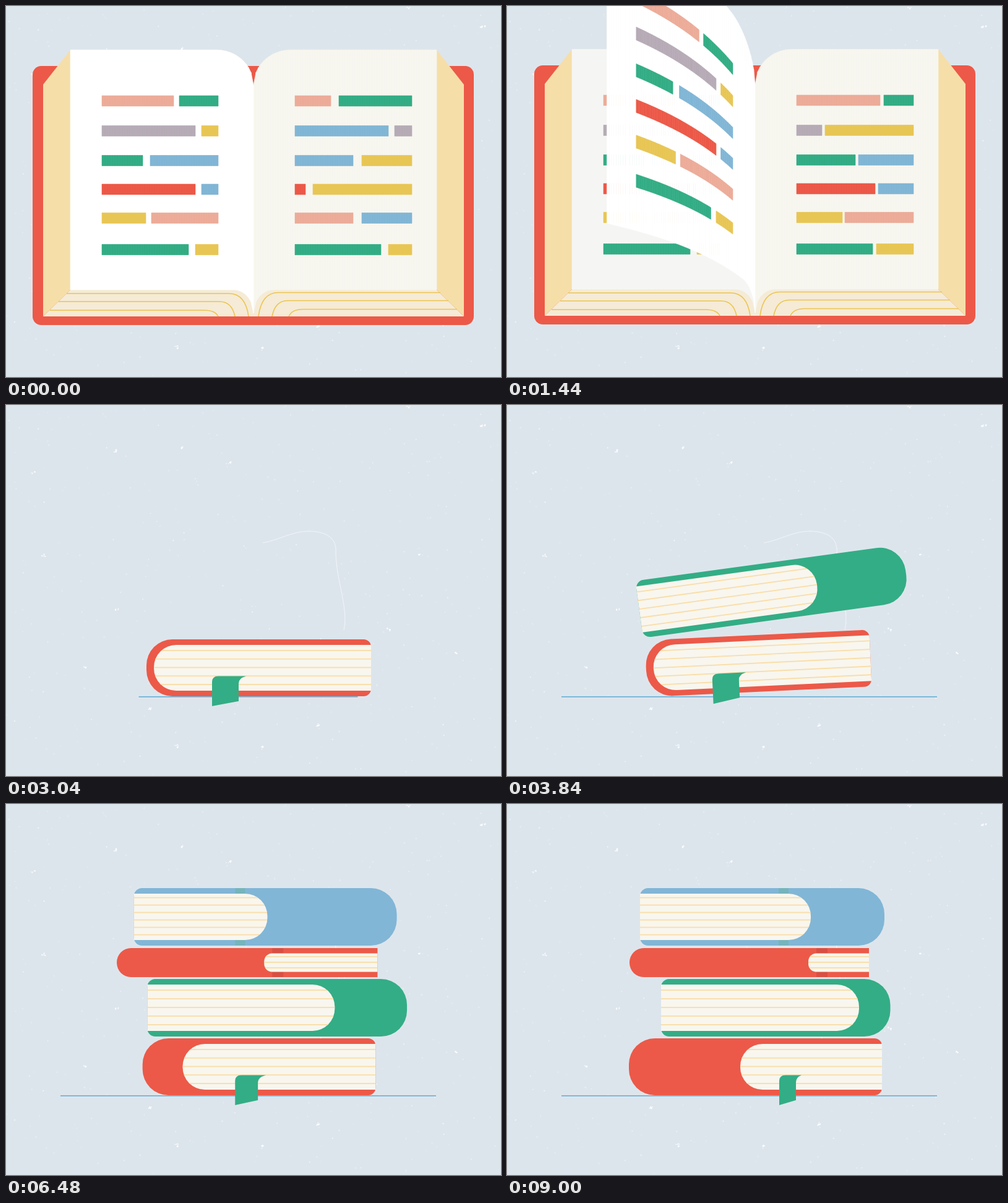
Write an HTML page with a canvas that moves like this. It is 800 px wide and 600 px high and loops after 9040 ms.

```html
<!DOCTYPE html>
<html>
<head>
<meta charset="utf-8">
<style>
html, body { margin: 0; width: 800px; height: 600px; overflow: hidden; background: #dde5ec; }
canvas { display: block; }
</style>
</head>
<body>
<canvas id="stage" width="800" height="600"></canvas>
<script>
const ctx = document.getElementById('stage').getContext('2d');
const LOOP = 9040, PI = Math.PI;
const RED = '#ec5948', DARK_RED = '#d94f42', GREEN = '#33ad85', BLUE = '#81b6d6';
const CREAM = '#f7f6ef', EDGE = '#f6dea9', BLOCK = '#f5ebd6', GOLD = '#ecc44f';
const INK = { P: '#ecac99', G: GREEN, M: '#b6abb6', Y: '#e8c655', B: BLUE, R: RED };

const clamp = (v) => Math.max(0, Math.min(1, v));
const lerp = (a, b, p) => a + (b - a) * p;
const span = (t, start, length) => clamp((t - start) / length);
const smooth = (p) => p * p * (3 - 2 * p);

function poly(points, fill, seam) {
  ctx.beginPath();
  points.forEach(([x, y]) => ctx.lineTo(x, y));
  ctx.closePath();
  ctx.fillStyle = fill;
  ctx.fill();
  if (seam) {
    ctx.strokeStyle = fill;
    ctx.lineWidth = 0.6;
    ctx.stroke();
  }
}

function rounded(x, y, w, h, radii, fill) {
  ctx.beginPath();
  ctx.roundRect(x, y, w, h, radii);
  ctx.fillStyle = fill;
  ctx.fill();
}

// ---- paper texture ----
const texture = document.createElement('canvas');
texture.width = 800;
texture.height = 600;
(function paintTexture() {
  const c = texture.getContext('2d');
  let seed = 7;
  const rnd = () => (seed = (seed * 16807) % 2147483647) / 2147483647;
  c.fillStyle = '#dde5ec';
  c.fillRect(0, 0, 800, 600);
  c.fillStyle = '#fff';
  const dot = (x, y, r, alpha) => {
    c.globalAlpha = alpha;
    c.beginPath();
    c.ellipse(x, y, r, r * (0.5 + rnd() * 0.5), rnd() * PI, 0, 2 * PI);
    c.fill();
  };
  for (let i = 0; i < 520; i++) dot(rnd() * 800, rnd() * 600, 0.4 + rnd() * 0.7, 0.25 + rnd() * 0.5);
  const flecks = [[650, 2], [180, 331], [503, 517], [361, 94], [284, 69], [43, 110], [275, 552],
    [412, 554], [770, 32], [128, 425], [727, 400], [667, 240], [617, 363], [60, 243], [233, 490], [175, 73]];
  flecks.forEach(([x, y]) => {
    for (let k = 0; k < 4; k++) dot(x + rnd() * 7 - 3, y + rnd() * 5 - 2, 0.8 + rnd(), 0.85);
  });
  c.globalAlpha = 0.65;
  c.strokeStyle = '#fff';
  c.lineWidth = 0.9;
  c.stroke(new Path2D('M415 223C440 219 462 204 490 204C520 205 535 216 533 240C534 285 554 330 546 364'));
})();

// ---- open book; distances run outward from the spine at x = 400 ----
const ROW_Y = [145, 193.5, 241.5, 288, 334.5, 385.5];
const text = (from, to, colors, cuts) => ({ from, to, colors: colors.split(' '), cuts });
const LEFT = text(57, 245, 'GP YM BG BR PY YG', [[120, 129], [84, 94], [167, 179], [84, 94], [165, 174], [94, 105]]);
const RIGHT_A = text(67, 256, 'PG BM BY RY PB GY', [[125, 138], [218, 228], [161, 175], [84, 96], [161, 175], [206, 218]]);
const RIGHT_B = text(67, 256, 'PG MY GB RB YP GY', [[202, 208], [108, 113], [162, 167], [194, 199], [141, 145], [190, 196]]);

const round = (d, r) => d < r ? 1 - Math.sqrt(1 - ((r - d) / r) ** 2) : 0;
const pageTop = (d) => 71 + 57 * round(d, 60);
const pageBottom = (d) => 459 + 38 * round(d, 32);

// angle 0 lies flat on the right, PI flat on the left
function page(angle, front, back, frontFill = CREAM, backFill = '#fff') {
  const N = 74, step = 296 / N;
  const bend = 0.5 * Math.min(1, 3 * Math.sin(angle));
  const xs = [0], hs = [0];
  for (let i = 0; i < N; i++) {
    const a = angle + (PI / 2 - angle) * bend * (1 - i / N) ** 1.5;
    xs.push(xs[i] + Math.cos(a) * step);
    hs.push(hs[i] + Math.sin(a) * step);
  }
  const at = (d, y) => {
    const i = Math.min(N - 1, Math.floor(d / step)), k = d / step - i;
    const lift = lerp(hs[i], hs[i + 1], k) / 140;
    return [400 + lerp(xs[i], xs[i + 1], k), y * (1 + 0.23 * lift) - 196 * lift];
  };
  for (let i = 0; i < N; i++) {
    const a = i * step, b = a + step;
    const facing = xs[i + 1] > xs[i];
    poly([at(a, pageTop(a)), at(b, pageTop(b)), at(b, pageBottom(b)), at(a, pageBottom(a))],
      facing ? frontFill : backFill, true);
  }
  for (let i = 0; i < N; i++) {
    const t = xs[i + 1] > xs[i] ? front : back;
    if (!t) continue;
    t.cuts.forEach(([cut1, cut2], row) => {
      [[t.from, cut1], [cut2, t.to]].forEach(([d1, d2], k) => {
        const a = Math.max(d1, i * step), b = Math.min(d2, (i + 1) * step), y = ROW_Y[row];
        if (a < b) poly([at(a, y), at(b, y), at(b, y + 17), at(a, y + 17)], INK[t.colors[row][k]], true);
      });
    });
  }
}

function blockLines(side, shift) {
  ctx.strokeStyle = GOLD;
  ctx.lineWidth = 1.6;
  [[465, 302, 40, 8], [478, 315, 55, 30], [492, 329, 80, 57]].forEach(([y, out, bend, end]) => {
    y += shift;
    ctx.beginPath();
    ctx.moveTo(400 + side * out, y);
    ctx.lineTo(400 + side * bend, y);
    ctx.quadraticCurveTo(400 + side * (end + 5), y, 400 + side * end, 502);
    ctx.stroke();
  });
}

function rightHalf() {
  rounded(400, 97, 356, 419, [0, 14, 14, 0], RED);
  poly([[696, 71], [740, 127], [740, 502], [696, 459]], EDGE);
  poly([[400, 459], [696, 459], [740, 502], [400, 502]], BLOCK);
  blockLines(1, -1.5);
}

function leftHalf(angle) {
  if (angle === PI) {
    rounded(43, 97, 357.5, 419, [14, 0, 0, 14], RED);
    poly([[104, 71], [60, 127], [60, 502], [104, 459]], EDGE);
    poly([[400, 459], [104, 459], [60, 502], [400, 502]], BLOCK);
    blockLines(-1, 0);
    return;
  }
  const at = ([d, y]) => [400 + d * Math.cos(angle), 306 + (y - 306) * (1 + 0.31 * Math.sin(angle) * d / 356)];
  const part = (points, fill) => poly(points.map(at), fill);
  part([[0, 97], [343, 97], [356, 111], [356, 502], [343, 516], [0, 516]], RED);
  if (angle > PI / 2) {
    part([[296, 71], [340, 127], [340, 502], [296, 459]], EDGE);
    part([[0, 459], [296, 459], [340, 502], [0, 502]], BLOCK);
    part([[0, 127], [20, 86], [60, 71], [296, 71], [296, 459], [30, 459], [0, 497]], '#f5f6f4');
  } else {
    const x = 400 + Math.min(32, 320 * Math.cos(angle));
    ctx.fillStyle = DARK_RED;
    ctx.fillRect(x, 95, 3.5, 408);
  }
}

function openBook(t) {
  const close = smooth(span(t, 1850, 650));
  const cover = PI * (1 - close);
  const slide = smooth(span(t, 1700, 500));
  const nudge = span(t, 200, 1000);
  ctx.save();
  ctx.translate(lerp(nudge, -150, slide), lerp(-nudge, -7, slide));
  if (cover > PI / 2) leftHalf(cover);
  rightHalf();
  const shade = close > 0.2 ? '#e2e9ec' : CREAM;
  page(0, t < 120 ? RIGHT_A : close > 0.35 ? null : RIGHT_B, null, shade);
  if (t < 1780) page(PI, null, LEFT, CREAM, t > 900 ? '#f5f6f4' : '#fff');

  [100, 808].forEach((start, i) => {
    const p = span(t, start, 800);
    if (p > 0 && p < 1) page(PI * smooth(p), i ? RIGHT_B : RIGHT_A, LEFT);
  });

  if (t >= 1780) {
    const leaves = [1750, 1780, 1810].map((start, i) =>
      ({ angle: PI * (1 - smooth(span(t, start, 530))), back: i ? null : LEFT, fill: ['#e6ecee', '#eaeeed', '#f5f5ee'][i] }));
    const draw = (leaf) => page(leaf.angle, null, leaf.back, leaf.fill);
    leaves.filter((l) => l.angle > PI / 2).reverse().forEach(draw);
    leaves.filter((l) => l.angle <= PI / 2).forEach(draw);
  }
  if (cover <= PI / 2) leftHalf(cover);
  ctx.restore();
}

// ---- stacked books: left, right and paper end at the key times ----
const KEYS = [3840, 5360, 7600, 9000];
function track(values, t) {
  t = Math.max(t, KEYS[0]);
  return values.reduce((sum, v, i) =>
    sum + KEYS.reduce((m, k, j) => j === i ? m : m * (t - k) / (KEYS[i] - k), v), 0);
}

const BOTTOM = { y: 379, h: 92, fill: RED, spineLeft: true, r: 42, corner: 12, pr: 36, inset: 9, lines: [18, 13.75, 5],
  left: [227, 227, 211, 197], right: [590, 594, 601, 606], paper: [239, 257, 323, 377] };
const STACK = [
  { land: 3800, y: 283, h: 93, fill: GREEN, r: 42, corner: 13, pr: 36, inset: 9, lines: [18, 14, 5],
    left: [220, 222, 237, 249], right: [655, 656, 636, 619.5], paper: [510, 519, 547, 569] },
  { land: 4300, y: 233, h: 47, fill: RED, spineLeft: true, r: 23, corner: 0, pr: 13, inset: 8.5, lines: [14, 9, 3],
    mark: [13, 18, DARK_RED], left: [164, 172, 187, 198], right: [612, 606, 594, 585], paper: [363, 393, 445, 487] },
  { land: 4800, y: 136, h: 93, fill: BLUE, r: 42, corner: 13, pr: 36, inset: 9, lines: [15.5, 12, 6],
    mark: [-52, 16, '#74b5bb'], left: [201, 204, 210, 215], right: [648, 639, 623, 610], paper: [367, 398, 450, 491] }
];

function book(b, t, y = b.y) {
  const L = track(b.left, t), R = track(b.right, t), P = track(b.paper, t);
  const { r, corner: c, pr, inset, h } = b;
  rounded(L, y, R - L, h, b.spineLeft ? [r, c, c, r] : [c, r, r, c], b.fill);
  if (b.mark) {
    ctx.fillStyle = b.mark[2];
    ctx.fillRect(P + b.mark[0], y, b.mark[1], h);
  }
  ctx.save();
  const x1 = b.spineLeft ? P : L, x2 = b.spineLeft ? R : P;
  rounded(x1, y + inset, x2 - x1, h - 2 * inset, b.spineLeft ? [pr, 0, 0, pr] : [0, pr, pr, 0], '#f8f6ee');
  ctx.clip();
  ctx.fillStyle = '#fadda8';
  const [first, gap, count] = b.lines;
  for (let i = 0; i < count; i++) ctx.fillRect(x1, y + first + i * gap - 0.9, x2 - x1, 1.8);
  ctx.restore();
}

function ribbon(t, y) {
  const a = track([333, 348, 399, 440], t), b = track([376, 388, 432, 467], t);
  const tip = track([388, 402, 443, 476], t);
  ctx.beginPath();
  ctx.moveTo(a, y + 108);
  ctx.lineTo(a, y + 69);
  ctx.quadraticCurveTo(a, y + 59.5, a + 10, y + 59.5);
  ctx.lineTo(tip, y + 59.5);
  ctx.quadraticCurveTo(b, y + 63, b, y + 71);
  ctx.lineTo(b, y + 100);
  ctx.closePath();
  ctx.fillStyle = GREEN;
  ctx.fill();
}

function tilted(x, y, degrees, draw) {
  ctx.save();
  ctx.translate(x, y);
  ctx.rotate(degrees * PI / 180);
  ctx.translate(-x, -y);
  draw();
  ctx.restore();
}

// the closed book tips from its cover onto its edge
function tipOver(t) {
  const p = smooth(span(t, 2560, 480));
  const x1 = lerp(250, 227, p), x2 = lerp(606, 590, p);
  const top = lerp(90, 379, p), fold = lerp(509, 379, p), bottom = lerp(509, 471, p);
  ctx.save();
  ctx.translate(x1 - 227, fold);
  ctx.scale(1, (bottom - fold) / 92);
  book(BOTTOM, t, 0);
  ribbon(t, 0);
  ctx.restore();
  if (p < 1) {
    rounded(x1, top, x2 - x1, fold - top + 4 * (1 - p), [0, 14, 14, 0], RED);
    ctx.fillStyle = DARK_RED;
    ctx.fillRect(x1 + 32, top, 3.5, fold - top);
  }
}

function stack(t) {
  const reach = 303.5 * smooth(span(t, 2840, 360));
  ctx.fillStyle = '#72b5d8';
  ctx.fillRect(391.5 - reach, 471, 2 * reach, 1.8);

  if (t < 3040) tipOver(t);
  else tilted(255, 472, -2.7 * Math.sin(PI * span(t, 3760, 160)), () => {
    book(BOTTOM, t);
    ribbon(t, BOTTOM.y);
  });

  STACK.forEach((b) => {
    const fall = span(t, b.land - 320, 320);
    if (!fall) return;
    const settle = span(t, b.land, 260);
    const drop = -(b.y + b.h + 60) * (1 - fall * fall);
    ctx.save();
    ctx.translate(0, drop);
    tilted(track(b.left, t) + 5, b.y + b.h, -8 * (1 - settle * settle), () => book(b, t));
    ctx.restore();
  });
}

const start = performance.now();
function frame() {
  const t = Math.floor(((performance.now() - start) % LOOP) / 40) * 40;
  ctx.drawImage(texture, 0, 0);
  if (t < 2560) openBook(t);
  else stack(t);
  requestAnimationFrame(frame);
}
frame();
</script>
</body>
</html>
```
